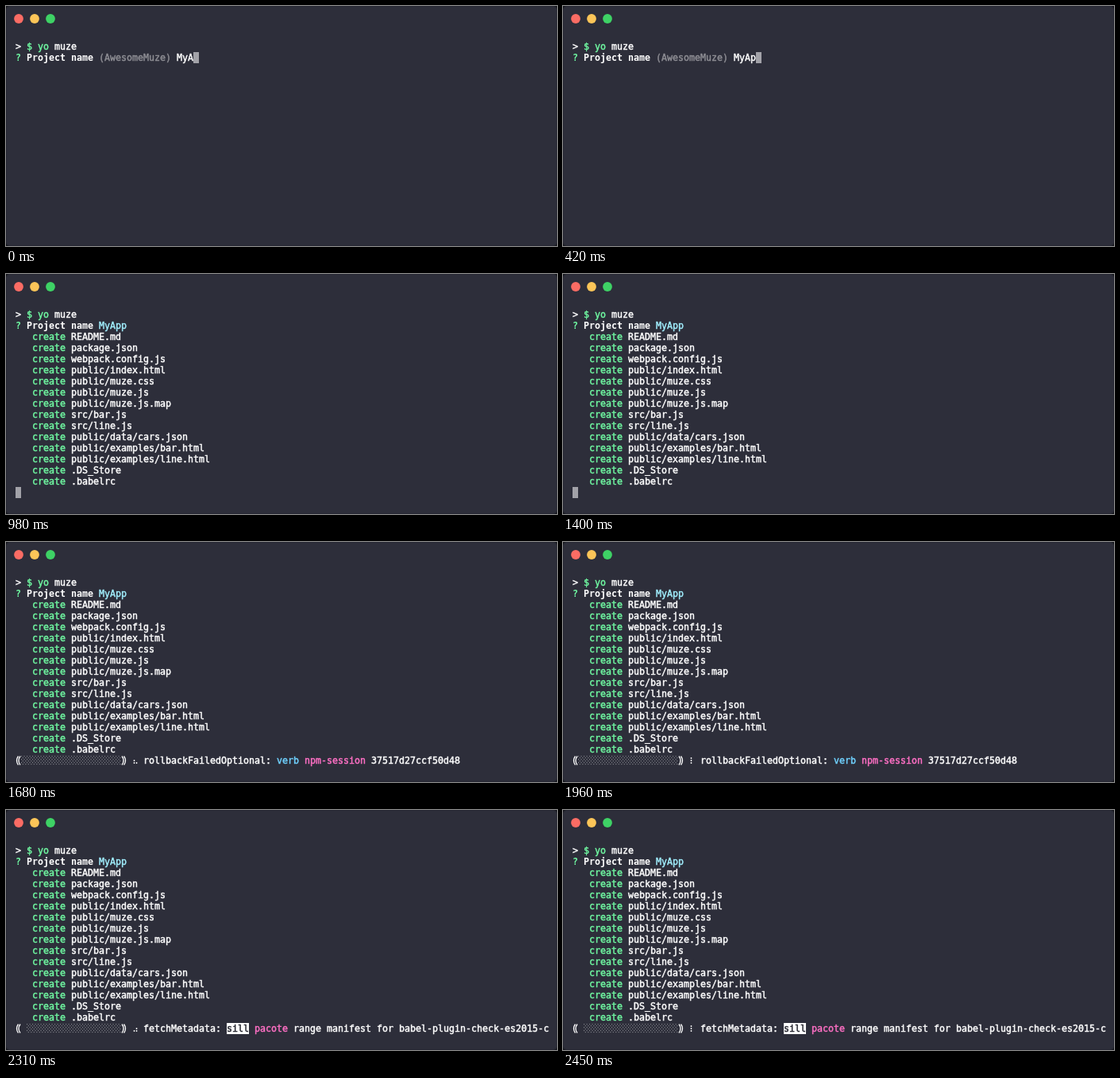
An HTML page with a canvas for the animation above (2520 ms loop, 694x302 px).

```html
<!DOCTYPE html>
<html lang="en">
<head>
<meta charset="utf-8">
<title>Terminal</title>
<style>
html, body { margin: 0; width: 100%; height: 100%; overflow: hidden; background: #14151b; }
canvas { display: block; }
</style>
</head>
<body>
<canvas id="stage" width="694" height="302"></canvas>
<script>
const ctx = document.getElementById('stage').getContext('2d');
const W = 694, H = 302, LOOP = 2520, STEP = 70;
const CELL = 7, ROW = 14, LEFT = 12, TOP = 44;
const FONT = '11.63px "DejaVu Sans Mono", "Liberation Mono", monospace';
const C = {
  bg: '#2d2e3a', edge: '#262732', white: '#ffffff', green: '#70f9a2', cyan: '#a2f0ff',
  blue: '#70d2ff', pink: '#ff70c5', gray: '#8e8e94', cursor: '#a2a2a8'
};
const FILES = [
  'README.md', 'package.json', 'webpack.config.js', 'public/index.html', 'public/muze.css',
  'public/muze.js', 'public/muze.js.map', 'src/bar.js', 'src/line.js', 'public/data/cars.json',
  'public/examples/bar.html', 'public/examples/line.html', '.DS_Store', '.babelrc'
];
const SPINNER = '⠋⠙⠹⠸⠼⠴⠦⠧⠇⠏';
const T = { p1: 420, p2: 560, enter: 770, files: 980, npm: 1680, fetch: 2100, next: 2310 };

const cellX = col => LEFT + col * CELL;
const rowY = row => TOP + row * ROW;

// Regular text gets a thin outline, which gives the heavier smoothed look.
function put(col, row, text, color = C.white, bold = false) {
  const x = cellX(col), y = rowY(row) + 11;
  ctx.font = (bold ? 'bold ' : '') + FONT;
  ctx.fillStyle = ctx.strokeStyle = color;
  ctx.fillText(text, x, y);
  if (!bold) {
    ctx.lineWidth = 0.45;
    ctx.lineJoin = 'round';
    ctx.strokeText(text, x, y);
  }
  return col + text.length;
}

function block(col, row, color, n = 1) {
  ctx.fillStyle = color;
  ctx.fillRect(cellX(col), rowY(row), n * CELL, ROW);
}

function dot(x, y, r, color) {
  ctx.fillStyle = color;
  ctx.beginPath();
  ctx.arc(x, y, r, 0, Math.PI * 2);
  ctx.fill();
}

function drawWindow() {
  ctx.fillStyle = '#14151b';
  ctx.fillRect(0, 0, W, H);
  ctx.fillStyle = C.bg;
  ctx.strokeStyle = C.edge;
  ctx.lineWidth = 1;
  ctx.beginPath();
  ctx.roundRect(0.5, 0.5, W - 1, H - 1, 4);
  ctx.fill();
  ctx.stroke();
  ['#fb6c64', '#fcc558', '#3ed265'].forEach((color, i) => dot(16 + 20 * i, 16, 5.9, color));
}

// Double round bracket; dir is 1 for the left one, -1 for the right one.
function bracket(col, row, dir) {
  const x = cellX(col) + CELL / 2, y = rowY(row);
  ctx.strokeStyle = C.white;
  ctx.lineWidth = 1.3;
  for (const dx of [-2.5, 0]) {
    ctx.beginPath();
    ctx.moveTo(x + dir * (dx + 2.5), y + 1.5);
    ctx.quadraticCurveTo(x + dir * (dx - 1.5), y + 7, x + dir * (dx + 2.5), y + 12.5);
    ctx.stroke();
  }
}

function shade(col, row, n) {
  ctx.fillStyle = '#85868d';
  const x = cellX(col), y = rowY(row);
  for (let j = 0; j < 6; j++)
    for (let i = 0; i < n * CELL / 3.5; i++)
      ctx.fillRect(x + i * 3.5 + (j % 2) * 1.75, y + 1 + j * 2, 1.1, 1.1);
}

function braille(col, row, ch) {
  const bits = ch.codePointAt(0) - 0x2800;
  for (let i = 0; i < 6; i++) {
    if (bits >> i & 1)
      dot(cellX(col) + 2.5 + 3 * Math.floor(i / 3), rowY(row) + 4 + 3 * (i % 3), 0.9, C.white);
  }
}

// The spinner turns faster once metadata is being fetched.
function spinnerAt(t) {
  const slow = Math.floor((Math.min(t, T.fetch) - T.npm) / 98);
  const fast = Math.floor(Math.max(0, t - T.fetch) / 42);
  return SPINNER[(6 + slow + fast) % SPINNER.length];
}

function drawPrompt(t) {
  put(0, 0, '>');
  put(2, 0, '$ yo', C.green);
  put(7, 0, 'muze');
  put(0, 1, '?', C.green, true);
  put(2, 1, 'Project name', C.white, true);
  if (t >= T.enter) {
    put(15, 1, 'MyApp', C.cyan);
    return;
  }
  put(15, 1, '(AwesomeMuze)', C.gray);
  const typed = 3 + (t >= T.p1) + (t >= T.p2);
  block(put(29, 1, 'MyApp'.slice(0, typed)), 1, C.cursor);
}

function drawProgress(t) {
  const row = 16, done = t >= T.fetch ? 1 : 0;
  bracket(0, row, 1);
  shade(1 + done, row, 18 - done);
  bracket(19, row, -1);
  braille(21, row, spinnerAt(t));
  if (!done) {
    put(23, row, 'rollbackFailedOptional:');
    put(47, row, 'verb', C.blue);
    put(52, row, 'npm-session', C.pink);
    put(64, row, '37517d27ccf50d48');
    return;
  }
  put(23, row, 'fetchMetadata:');
  block(38, row, C.white, 4);
  put(38, row, 'sill', '#22232c');
  put(43, row, 'pacote', C.pink);
  put(50, row, 'range manifest for ' + (t < T.next
    ? 'mkdirp@^0.5.1 fetched in 81'
    : 'babel-plugin-check-es2015-c'));
}

function draw(now) {
  const t = Math.floor(now % LOOP / STEP) * STEP;
  drawWindow();
  drawPrompt(t);
  if (t >= T.files) {
    FILES.forEach((name, i) => {
      put(3, i + 2, 'create', C.green);
      put(10, i + 2, name);
    });
  }
  if (t >= T.npm) drawProgress(t);
  else if (t >= T.files) block(0, 16, C.cursor);
  else if (t >= T.enter) block(0, 2, C.cursor);
}

const start = performance.now();
function tick() {
  draw(performance.now() - start);
  requestAnimationFrame(tick);
}
tick();
</script>
</body>
</html>
```
